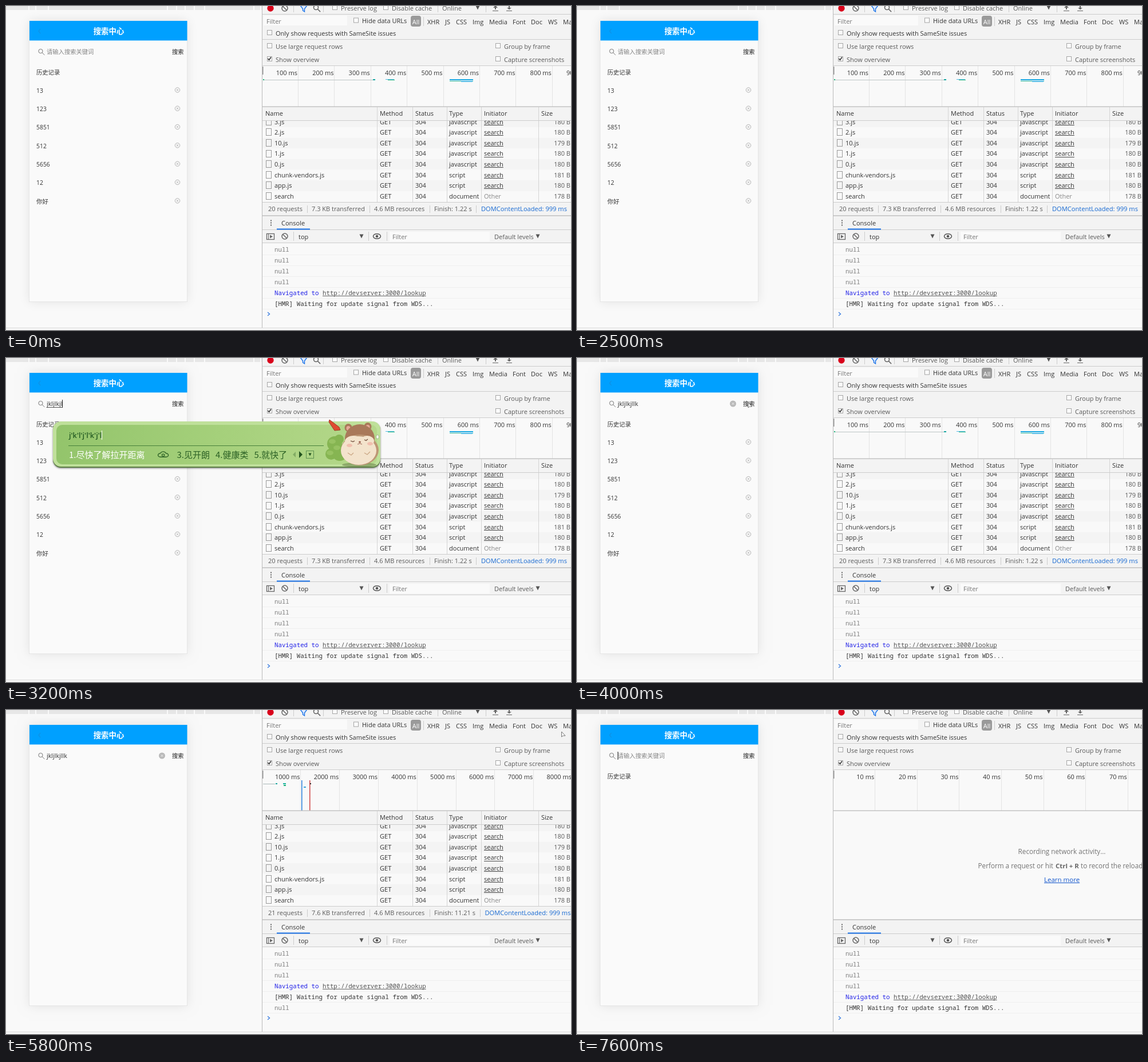
An HTML page with a canvas that plays this animation: 987x567 px, repeating every 8 s.

```html
<!DOCTYPE html>
<html lang="zh">
<head>
<meta charset="utf-8">
<style>
html, body { margin: 0; width: 100%; height: 100%; overflow: hidden; background: #f9f9f9; }
canvas { display: block; }
</style>
</head>
<body>
<canvas id="stage" width="987" height="567"></canvas>
<script>
const c = document.getElementById('stage').getContext('2d');
const LOOP = 8000;
const UI = '"Open Sans", "Noto Sans CJK SC", "Noto Sans CJK", sans-serif';
const HAN = '"Noto Sans CJK SC", "Noto Sans CJK", sans-serif';
const MONO = '"Noto Sans Mono", monospace';
const INK = '#333', DIM = '#5a5a5a', LINE = '#ccc', BAR = '#f3f3f3', PAPER = '#f9f9f9';

// Drawing helpers
function rect(x, y, w, h, fill) { c.fillStyle = fill; c.fillRect(x, y, w, h); }
function hline(x, y, w, color = LINE) { rect(x, y, w, 1, color); }
function vline(x, y, h, color = LINE) { rect(x, y, 1, h, color); }
function frame(x, y, w, h, color, width = 1) {
  c.strokeStyle = color;
  c.lineWidth = width;
  c.strokeRect(x + .5, y + .5, w, h);
}
function text(s, x, mid, color = INK, size = 11, font = UI, weight = 400, align = 'left') {
  c.font = `${weight} ${size}px ${font}`;
  c.textAlign = align;
  c.fillStyle = color;
  c.fillText(s, x, Math.round(mid + size * .36));
  return c.measureText(s).width;
}
function path(points, color, width = 1, fill) {
  c.beginPath();
  for (let i = 0; i < points.length; i += 2) c.lineTo(points[i], points[i + 1]);
  if (fill) { c.closePath(); c.fillStyle = fill; c.fill(); }
  if (color) { c.strokeStyle = color; c.lineWidth = width; c.stroke(); }
}
function oval(x, y, rx, ry, fill, stroke, width = 1) {
  c.beginPath();
  c.ellipse(x, y, rx, ry, 0, 0, Math.PI * 2);
  if (fill) { c.fillStyle = fill; c.fill(); }
  if (stroke) { c.strokeStyle = stroke; c.lineWidth = width; c.stroke(); }
}
function box(x, y, w, h, r, fill) {
  c.beginPath();
  c.roundRect(x, y, w, h, r);
  c.fillStyle = fill;
  c.fill();
}
function down(x, y, s = 3.5, color = '#555') { path([x - s, y - s, x + s, y - s, x, y + s], null, 0, color); }
function lens(x, y, r, color, width) {
  oval(x, y, r, r, null, color, width);
  path([x + r * .7, y + r * .7, x + r * 1.9, y + r * 1.9], color, width);
}
function ban(x, y) {
  oval(x, y, 5, 5, null, '#666', 1.5);
  path([x - 3.5, y - 3.5, x + 3.5, y + 3.5], '#666', 1.5);
}
function check(x, y, label, on, color = DIM) {
  rect(x - 4, y - 6, 9, 9, '#a6a6a6');
  rect(x - 3, y - 5, 7, 7, '#fbfbfb');
  if (on) path([x - 2.5, y - 2, x - .5, y + .5, x + 3, y - 4.5], '#333', 1.6);
  text(label, x + 11, y, color);
}

// Timeline
const within = (t, a, b) => t >= a && t < b;
const carets = [[1100, 1600], [2000, 2500], [2600, 3800], [4200, 4700], [5200, 5700], [6300, 6600], [7600, 8000]];
const typing = [
  [2600, 'jkl', ['尽快了', '2', '见开朗', '健康类', '就快了']],
  [2800, 'jkljl', ['尽快了解了', '2', '尽快了解啦', '见开朗', '健康类']],
  [2900, 'jkljlk', ['尽快了解了开', '2', '尽快了解啦', '见开朗', '健康类']],
  [3000, 'jkljlkj', ['尽快了解拉开就', '2', '尽快了解拉开', '尽快了解', '健康类']],
  [3100, 'jkljlkj', ['尽快了解拉开就', '', '尽快了解拉开', '见开朗', '健康类']],
  [3200, 'jkljlkjl', ['尽快了解拉开距离', '', '见开朗', '健康类', '就快了']]
];

function phone(t) {
  rect(0, 0, 447, 7, '#e7e7e7');
  for (const x of [39, 51, 73, 281, 297, 312, 328, 346, 432, 444]) rect(x, 0, 2, 7, '#fafafa');
  c.save();
  c.shadowColor = 'rgba(0,0,0,.1)';
  c.shadowBlur = 18;
  rect(41, 26, 275, 491, '#fafafa');
  c.restore();
  frame(40, 26, 276, 491, '#e6e6e6');
  rect(41, 26, 275.5, 34.4, '#00a0ff');
  path([60, 40, 57, 44, 60, 48], '#1689d8');
  text('搜索中心', 179.5, 44, '#fff', 13.4, HAN, 700, 'center');

  lens(60.5, 79, 3.6, '#777', 1);
  const state = typing.filter(s => s[0] <= t).pop();
  const composing = within(t, 2600, 3300);
  const value = composing ? state[1] : within(t, 3300, 6600) ? 'jkljlkjllk' : '';
  let end = 71;
  if (value) {
    const w = text(value, 71, 80, INK, 10.7);
    end += w;
    if (composing) hline(71, 86, w, '#555');
    else {
      oval(272.5, 80, 5.5, 5.5, '#b9b9b9');
      path([270.5, 78, 274.5, 82], '#eee');
      path([274.5, 78, 270.5, 82], '#eee');
    }
  } else text('请输入搜索关键词', 71, 80.5, '#858585', 10.3, HAN);
  if (carets.some(([a, b]) => within(t, a, b))) vline(Math.round(end), 73, 14, '#222');
  text('搜索', 290, 80.5, '#222', 10.3, HAN);

  if (t < 4200 || t >= 6600) text('历史记录', 53, 116, '#333', 10.3, HAN);
  if (t < 4200) ['13', '123', '5851', '512', '5656', '12', '你好'].forEach((s, i) => {
    const y = 147.5 + i * 32.3;
    text(s, 53, y + .5, INK, 10.4);
    oval(299.5, y - .5, 4.2, 4.2, null, '#aaa', .9);
    path([297.7, y - 2.3, 301.3, y + 1.3], '#aaa', .9);
    path([301.3, y - 2.3, 297.7, y + 1.3], '#aaa', .9);
  });
}

function filters() {
  rect(448, 0, 539, 105, BAR);
  oval(462, 4, 5.7, 5.7, '#d9001b');
  ban(487, 4);
  path([514, -1, 526, -1, 521.5, 5, 521.5, 10, 518.5, 8, 518.5, 5], '#1a73e8', 1.4, '#dce9fc');
  lens(541.5, 2.5, 4, '#666', 1.6);
  for (const x of [502, 554, 754, 838]) vline(x, 0, 11);
  check(574, 4, 'Preserve log');
  check(663, 4, 'Disable cache');
  text('Online', 762, 4, DIM);
  down(824, 3);
  for (const [x, tip] of [[855, -1], [879, 6]]) {
    path([x, -1, x, 6], '#666', 2);
    path([x - 4, 3, x + 4, 3, x, tip], null, 0, '#666');
    hline(x - 5, 8, 10, '#666');
  }
  hline(448, 14, 539);

  rect(450, 17, 146, 17, '#fafafa');
  text('Filter', 455, 27, '#777');
  check(611, 26.5, 'Hide data URLs', false, INK);
  box(707, 17, 18, 19, 4, '#9a9a9a');
  text('All', 716, 28, '#fff', 11, UI, 400, 'center');
  vline(729, 19, 16);
  const kinds = { XHR: 736, JS: 767, CSS: 786, Img: 815, Media: 844, Font: 885, Doc: 917, WS: 947, Manifest: 973 };
  for (const k in kinds) text(k, kinds[k], 28, INK);
  check(460, 48, 'Only show requests with SameSite issues', false, INK);
  hline(448, 58, 539);
  check(460, 71, 'Use large request rows');
  check(859, 71, 'Group by frame');
  check(460, 94, 'Show overview', true);
  check(859, 94, 'Capture screenshots');
  hline(448, 104, 539);
}

function overview(t) {
  const [step, unit] = t < 4200 ? [63.4, 100] : t < 6600 ? [67.8, 1000] : [73.6, 10];
  rect(448, 105, 539, 71, PAPER);
  for (let n = 1; n < 10; n++) {
    const x = 447.6 + n * step;
    vline(Math.round(x) - 1, 105, 71, '#e4e4e4');
    text(`${n * unit} ms`, x - 2, 117, INK, 11, UI, 400, 'right');
  }
  rect(448, 106, 1.5, 14, '#999');
  if (unit === 100) {
    hline(451, 129, 190, '#bcc4c4');
    rect(449, 128, 2, 2, '#1bb37a');
    rect(641, 128, 4, 2, '#14a6a0');
    hline(663, 128, 15, '#58b9e8');
    hline(667, 129, 12, '#1bb37a');
    rect(775, 128, 41, 2, '#1ba9e1');
    rect(775, 131, 41, 1, '#35b89a');
    rect(795, 131, 20, 2, '#54bde8');
  } else if (unit === 1000) {
    hline(449, 129, 21, '#aab8b8');
    rect(471, 128, 3, 2, '#14a6a0');
    rect(484, 128, 5, 2, '#1bb3a0');
    rect(485, 131, 4, 2, '#1bb37a');
    rect(516, 123, 1.5, 53, '#2c82dd');
    rect(530, 123, 1.5, 53, '#d04545');
    rect(520, 134, 4, 2, '#3ba5d8');
    if (t >= 4500) rect(531, 128, 2, 2, '#333');
  }
  rect(448, 175.5, 539, 1.5, '#c4c4c4');
}

function requests(t) {
  rect(448, 177, 539, 190, PAPER);
  if (t >= 6600) {
    const gray = '#737373', size = 11.7;
    text('Recording network activity…', 847, 248, gray, size, UI, 400, 'center');
    text('Perform a request or hit', 832, 272.5, gray, size, UI, 400, 'right');
    text('Ctrl + R', 836, 272.5, '#666', 11.4, UI, 700);
    text('to record the reload.', 880, 272.5, gray, size);
    const w = text('Learn more', 816, 297, '#1155cc', 11.5);
    hline(816, 302, w, '#1155cc');
    return;
  }
  const names = ['3.js', '2.js', '10.js', '1.js', '0.js', 'chunk-vendors.js', 'app.js', 'search'];
  const sizes = [180, 180, 179, 180, 180, 181, 180, 178];
  c.save();
  c.beginPath();
  c.rect(448, 200, 539, 143);
  c.clip();
  names.forEach((name, i) => {
    const y = 202.7 + i * 18.6, last = i === 7;
    if (i % 2 === 0) rect(448, y - 9.3, 539, 18.6, '#f4f4f4');
    frame(454, Math.round(y) - 7, 9, 12, '#999');
    text(name, 469, y, INK);
    text('GET', 653, y, INK);
    text('304', 715, y, INK);
    text(last ? 'document' : i < 5 ? 'javascript' : 'script', 774, y, INK);
    const w = text(last ? 'Other' : 'search', 835, y, last ? '#888' : INK);
    if (!last) hline(835, Math.round(y + 5), w, '#444');
    text(sizes[i] + ' B', 986, y, DIM, 11, UI, 400, 'right');
  });
  c.restore();
  rect(448, 177, 539, 23, BAR);
  const cols = { Name: 453, Method: 653, Status: 715, Type: 774, Initiator: 835, Size: 935 };
  for (const k in cols) text(k, cols[k], 188.5, INK);
  for (const x of [648, 710, 770, 830, 930]) vline(x, 177, 166, '#d4d4d4');
  hline(448, 200, 539);

  rect(448, 343, 539, 24, BAR);
  hline(448, 343, 539);
  const late = t >= 4200, shift = late ? 6.5 : 0;
  text(late ? '21 requests' : '20 requests', 458, 355.5, DIM);
  text(late ? '7.6 KB transferred' : '7.3 KB transferred', 534, 355.5, DIM);
  text('4.6 MB resources', 643, 355.5, DIM);
  text(late ? 'Finish: 11.21 s' : 'Finish: 1.22 s', 748, 355.5, DIM);
  text('DOMContentLoaded: 999 ms', 830 + shift, 355.5, '#1769d2', 11.1);
  for (const x of [526, 635, 740, 821 + Math.round(shift)]) vline(x, 349, 13);
}

function drawer(t) {
  rect(448, 367, 539, 48, BAR);
  rect(448, 366, 539, 2, LINE);
  for (let i = -1; i < 2; i++) rect(462, 378.5 + i * 4, 2, 2, '#666');
  text('Console', 481, 380, INK);
  hline(448, 391, 539);
  rect(473, 389.5, 58, 2, '#1a73e8');
  frame(455, 398, 13, 10, '#666', 1.3);
  vline(458, 399, 10, '#666');
  path([461, 400.5, 466, 403.5, 461, 406.5], null, 0, '#666');
  ban(487, 403);
  for (const x of [502, 633, 665]) vline(x, 395, 16);
  text('top', 511, 404, INK);
  down(621, 403);
  oval(648, 403, 6.5, 4.3, null, '#555', 1.5);
  oval(648, 403, 2.3, 2.3, '#555');
  rect(670, 395, 175, 17, '#fafafa');
  text('Filter', 675, 404, '#777');
  text('Default levels', 853, 404, DIM);
  down(929, 403);
  hline(448, 414, 539);

  rect(448, 415, 539, 148, PAPER);
  const nav = within(t, 4500, 6600) ? 3 : 4;
  for (let i = 0; i < 6; i++) {
    const y = 426 + i * 19.05, say = (s, x, color) => text(s, x, y, color, 10.75, MONO);
    if (i === nav) {
      say('Navigated to', 469, '#2222e8');
      const w = say('http://devserver:3000/lookup', 553, '#555');
      hline(553, Math.round(y + 5), w, '#666');
    } else if (i === nav + 1) say('[HMR] Waiting for update signal from WDS...', 469, '#333');
    else say('null', 469, '#808080');
    hline(448, Math.round(y + 9), 539, '#efefef');
  }
  path([457, 536, 460.5, 539, 457, 542], '#3b7de0', 1.4);
}

function cloud(x, y, color) {
  c.beginPath();
  c.ellipse(x - 5, y + 1, 4, 3.2, 0, Math.PI / 2, Math.PI * 1.5);
  c.ellipse(x, y - 1.5, 4.8, 3.6, 0, Math.PI * 1.1, Math.PI * 1.9);
  c.ellipse(x + 5, y + 1, 4, 3.2, 0, -Math.PI / 2, Math.PI / 2);
  c.closePath();
  c.strokeStyle = color;
  c.lineWidth = 1.4;
  c.stroke();
  oval(x, y + 1, 2.2, 1.8, null, color, 1.2);
}

// Bush, butterfly and hamster, placed from the right edge of the candidate panel
function hamster(right) {
  const brown = '#a9795a', cream = '#f3e3cc', pink = '#e6a998';
  c.save();
  c.translate(right - 646, 0);
  for (const [x, y, r] of [[566, 150, 13], [560, 168, 10], [575, 166, 14], [574, 142, 8]]) oval(x, y, r, r, '#86b552');
  for (const [x, y] of [[562, 146], [570, 157], [558, 166]]) oval(x, y, 6, 4, '#97c262');
  path([566, 127, 556, 112, 557, 108, 565, 114, 574, 121, 576, 126], '#8e2f1e', .8, '#df4b31');
  oval(609, 187, 30, 4, 'rgba(70,90,40,.4)');
  for (const [x, y] of [[590, 122], [624, 120]]) {
    oval(x, y, 6.5, 7, brown);
    oval(x, y + 1, 3.5, 4, pink);
  }
  oval(610, 141, 26, 25, brown);
  oval(610, 161, 33, 27, '#bd9674');
  oval(608, 162, 31, 25, cream);
  oval(599, 146, 15, 10, cream);
  oval(623, 145, 12, 9, cream);
  oval(592, 153, 5, 3, '#f0bfae');
  oval(628, 150, 5, 3, '#f0bfae');
  path([594, 145, 598, 146.5, 601, 145], '#6b4a38', 1.2);
  path([618, 143, 621, 144.5, 624, 142], '#6b4a38', 1.2);
  oval(610, 147, 2, 1.5, '#9a5f4f');
  path([606, 151, 610, 149.5, 614, 151], '#9a5f4f');
  path([589, 166, 595, 170, 599, 166], '#c9a582', 1.2);
  path([618, 166, 623, 169, 628, 164], '#c9a582', 1.2);
  oval(641, 138, 2.5, 3.5, '#f6f8ee', '#91a878', .8);
  c.restore();
}

function candidates(t) {
  if (!within(t, 2600, 3300)) return;
  const [, letters, words] = typing.filter(s => s[0] <= t).pop();
  const green = '#2c6125', gap = 9.8;
  const widths = words.map(w => w === '2' ? 40 : w === '' ? 36 : 12.8 + w.length * 15);
  const right = Math.round(widths.reduce((a, b) => a + b + gap, 110) - gap + 162.5);
  c.save();
  c.shadowColor = 'rgba(0,0,0,.5)';
  c.shadowBlur = 3;
  c.shadowOffsetY = 1;
  box(82, 112, right - 82, 80, 14, '#5f8148');
  c.restore();
  box(82, 111, right - 82, 79, 14, '#bfe09a');
  const g = c.createLinearGradient(90, 115, right, 190);
  g.addColorStop(0, '#93c46b');
  g.addColorStop(.5, '#a5d07b');
  g.addColorStop(1, '#b6d88c');
  box(88, 117, right - 94, 69, 10, g);
  const w = text(letters.split('').join("'"), 110, 135, '#235a22', 12.7, UI, 600);
  vline(Math.round(110 + w), 127, 16, '#fff');
  hline(109, 153, right - 208, '#48813b');

  let x = 110;
  words.forEach((word, i) => {
    if (word.length > 1) text(`${i + 1}.${word}`, x, 169.4, i ? green : '#fff', 15, HAN);
    else {
      if (word) text('2.', x, 169.4, green, 15, HAN);
      cloud(x + 22, 169, green);
    }
    x += widths[i] + gap;
  });
  path([right - 148, 164, right - 153, 169, right - 148, 174], null, 0, '#82ac64');
  path([right - 142, 163, right - 136, 169, right - 142, 175], null, 0, '#22521e');
  frame(right - 130, 162, 13, 13, '#5f9150');
  down(right - 123, 169, 2.6, '#22521e');
  hamster(right);
}

function pointer(t) {
  const tick = Math.floor(t / 100) * 100;
  let x, y;
  if (within(t, 100, 200)) [x, y] = [981, 44];
  else if (within(t, 3700, 4200)) {
    const k = Math.min(1, (tick - 3700) / 300);
    [x, y] = [247 + 52 * k, 128 - 50 * k];
  } else if (within(t, 5500, 6100)) {
    const k = (tick - 5500) / 500;
    [x, y] = [982 - 12 * Math.sin(k * Math.PI), 68 - 50 * k];
  } else if (within(t, 6300, 6400)) [x, y] = [980, 20];
  else return;
  path([x, y, x, y + 9, x + 2.5, y + 7, x + 6.5, y + 7, x, y], '#555', .8, '#fff');
}

function draw(now) {
  const t = now % LOOP;
  rect(0, 0, 987, 567, PAPER);
  phone(t);
  filters();
  overview(t);
  requests(t);
  drawer(t);
  vline(447, 0, 563, '#bbb');
  hline(0, 563, 987, '#d8d8d8');
  candidates(t);
  pointer(t);
  requestAnimationFrame(draw);
}
requestAnimationFrame(draw);
</script>
</body>
</html>
```
